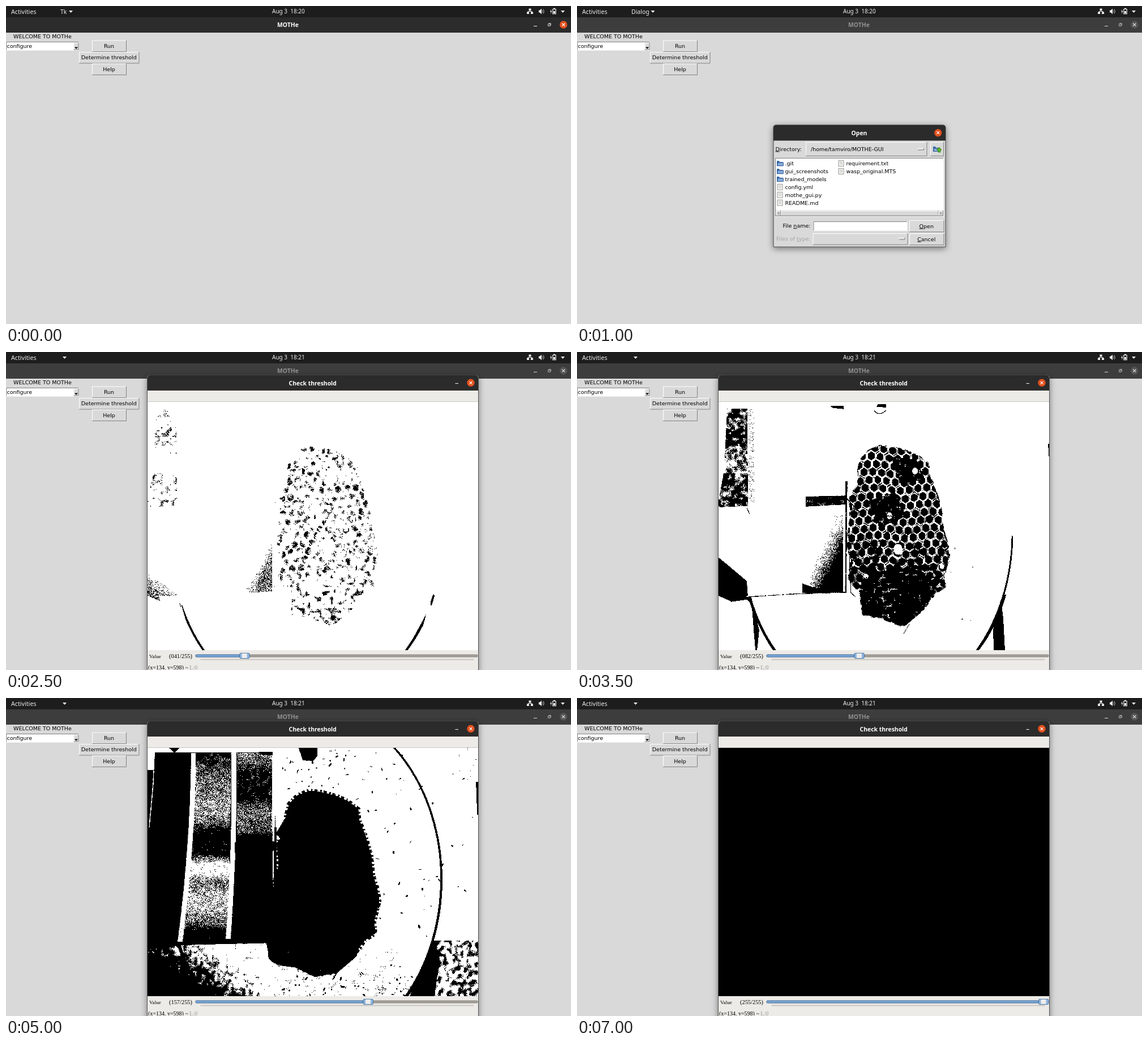
Write an HTML page with a canvas that moves like this. It is 998 px wide and 561 px high and loops after 7.5 s.

```html
<!DOCTYPE html>
<html lang="en">
<head>
<meta charset="utf-8">
<title>Threshold picker</title>
<style>
html, body { margin: 0; width: 100%; height: 100%; overflow: hidden; background: #d9d9d9; }
svg, canvas { position: absolute; left: 0; top: 0; display: block; }
canvas { left: 250px; top: 88px; }
text { white-space: pre; }
.tk { font: 9.5px "DejaVu Sans", sans-serif; }
.bar { font: 10.5px "Noto Sans", "Open Sans", sans-serif; fill: #eee; }
.head { font: bold 10.4px "Noto Sans", "Open Sans", sans-serif; text-anchor: middle; fill: #fff; }
.serif { font: 10.4px "Liberation Serif", serif; }
.mid { text-anchor: middle; }
.end { text-anchor: end; }
</style>
</head>
<body>
<svg id="stage" width="998" height="561" viewBox="0 0 998 561"></svg>
<canvas id="photo" width="584" height="438"></canvas>
<script>
const LOOP = 7500, STEP = 500;
const IMG = { x: 250, y: 88, w: 584, h: 438 };
const byId = id => document.getElementById(id);

// ---------- interface ----------
const rect = (x, y, w, h, fill, more = '') =>
  `<rect x="${x}" y="${y}" width="${w}" height="${h}" fill="${fill}" ${more}/>`;
const text = (x, y, str, cls = 'tk', more = '') =>
  `<text x="${x}" y="${y}" class="${cls}" ${more}>${str}</text>`;
const path = (d, fill, more = '') => `<path d="${d}" fill="${fill}" ${more}/>`;
const line = (d, color, width = 1) =>
  path(d, 'none', `stroke="${color}" stroke-width="${width}"`);
const under = c => `<tspan text-decoration="underline">${c}</tspan>`;

function bevel(x, y, w, h, face = '#d9d9d9', light = '#fff', dark = '#828282') {
  const r = x + w - .5, b = y + h - .5;
  return rect(x, y, w, h, face) +
    line(`M${x + .5} ${b}V${y + .5}H${r}`, light) +
    line(`M${x} ${b}H${r}V${y}`, dark);
}
const sunken = (x, y, w, h, face) => bevel(x, y, w, h, face, '#828282', '#f4f4f4');
const button = (x, y, w, h, label) =>
  bevel(x, y, w, h) + text(x + w / 2 - .5, y + h / 2 + 3, label, 'tk mid');
const closeIcon = (x, y, id = '') =>
  `<circle ${id} cx="${x}" cy="${y}" r="6.7" fill="#e2501d"/>` +
  line(`M${x - 2.5} ${y - 2.5}l5 5m0 -5l-5 5`, '#fff', 1.2);
const handle = (x, y) => bevel(x, y, 11, 4);

function folder(x, y) {
  return path(`M${x} ${y + 1}h4l1 2h6v7h-11z`, '#3465a4') +
    path(`M${x + 1} ${y + 4}h10.5v5.5h-10.5z`, '#86abd9', 'stroke="#28528c" stroke-width=".8"');
}
function sheet(x, y) {
  return rect(x + 1, y + .5, 9, 10, '#f5f5f3', 'stroke="#8c8c88" stroke-width=".9"') +
    line(`M${x + 3} ${y + 3}h5m-5 2h5m-5 2h5`, '#b5b5b2', .8);
}
const entry = (icon, x, y, name) => icon(x, y - 9) + text(x + 14.5, y, name);

const desktop = () => [
  rect(0, 0, 998, 561, '#d9d9d9'),
  rect(0, 0, 998, 20, '#1d1d1d'),
  text(9, 13.5, 'Activities', 'bar', 'style="font-size:10.7px"'),
  text(96, 13.5, '', 'bar', 'id="app"'),
  path('M-3.5 8h7l-3.5 4z', '#eee', 'id="arrow"'),
  text(470, 13, '', 'bar', 'id="clock" style="font-size:10px"'),
  // network, volume, battery, menu
  rect(923.5, 4.5, 4, 3.5, '#eee') + rect(920, 10.5, 4, 3.5, '#eee') + rect(927, 10.5, 4, 3.5, '#eee'),
  line('M925.5 8v1.5M922 11V9.5h7V11', '#eee'),
  path('M941 7.5h2l3 -3v10l-3 -3h-2z', '#eee'),
  line('M947.5 7q1.5 2.5 0 5M949 5.5q3 4 0 8', '#bbb', .9),
  line('M965.8 5.5h5.4v8.5h-5.4zM967 4.4h3', '#eee', 1.2) + rect(967, 9, 3, 4, '#eee'),
  path('M963.5 5.5l-2.5 4.5h1.6l-.8 4 2.6 -5h-1.6z', '#eee'),
  path('M980 8h7l-3.5 4z', '#eee'),
  rect(0, 20, 998, 27, '#2c2c2c', 'id="titleBar"'),
  text(498, 37, 'MOTHe', 'head', 'id="title"'),
  '<g id="controls">',
  line('M932 35.5h6', '#fff'),
  line('M957.5 31.8h3.5v3.5h-3.5zM958.8 31.5v-1h3.5v3.7h-1', '#ddd', .9),
  closeIcon(984.7, 33, 'id="close"'),
  '</g>',
  text(13, 56.5, 'WELCOME TO MOTHe'),
  sunken(0, 63, 129, 15.5, '#fff'),
  text(1.5, 73.5, 'configure'),
  bevel(119.5, 64.5, 9, 13) + path('M121 72.5h6l-3 3.2z', '#000'),
  button(152, 60.5, 61, 20.5, 'Run'),
  button(129, 81, 106.5, 20.5, 'Determine threshold'),
  button(152, 101.5, 61, 20.5, 'Help')
].join('');

const dialog = () => [
  '<g id="dialog">',
  path('M347 425V215q0 -5 5 -5h294q5 0 5 5v210z', '#d9d9d9',
    'filter="url(#shadow)" stroke="#444"'),
  path('M347 237.5V215q0 -5 5 -5h294q5 0 5 5v22.500z', '#2b2b2b'),
  text(498.5, 228, 'Open', 'head'),
  closeIcon(637.7, 223.7),
  text(350.500, 255.5, under('D') + 'irectory:'),
  bevel(404, 240, 214.5, 25) + text(413, 255.5, '/home/tamviro/MOTHE-GUI') + handle(602, 250.5),
  bevel(624, 240, 24, 25) + folder(629, 247) + path('M638 258v-4h-3l5 -5 4 5h-2v4z', '#58b523', 'stroke="#2c7410" stroke-width=".7"'),
  sunken(350, 268, 298, 104, '#fff'),
  ['.git', 'gui_screenshots', 'trained_models', 'config.yml', 'mothe_gui.py', 'README.md']
    .map((n, i) => entry(i < 3 ? folder : sheet, 353, 281.3 + i * 13.85, n)).join(''),
  ['requirement.txt', 'wasp_original.MTS']
    .map((n, i) => entry(sheet, 461, 281.3 + i * 13.85, n)).join(''),
  rect(351, 360.5, 296, 10.5, '#c3c3c3') + bevel(360, 361, 278.5, 9.5),
  bevel(351, 361, 9, 9.5) + bevel(638.5, 361, 8.500, 9.5),
  path('M357.500 363v5.500l-4 -2.700zM641 363v5.500l4 -2.700z', '#a3a3a3'),
  text(412.5, 391, `File ${under('n')}ame:`, 'tk end'),
  sunken(417.5, 380, 166, 17, '#fff'),
  text(412.5, 414, `Files of ${under('t')}ype:`, 'tk end', 'fill="#a3a3a3"'),
  bevel(416.5, 401, 168, 20.5) + handle(568.5, 408.5),
  button(587, 378, 61.5, 21, under('O') + 'pen'),
  button(587, 401, 61.5, 21, under('C') + 'ancel'),
  '</g>'
].join('');

const viewer = () => [
  '<g id="viewer">',
  path('M249.500 570V46q0 -5 5 -5h575q5 0 5 5v524z', '#edebe7', 'filter="url(#shadow)" stroke="#555"'),
  path('M250 68V46q0 -5 5 -5h574q5 0 5 5v22z', '#2b2b2b'),
  text(541.7, 58.500, 'Check threshold', 'head'),
  line('M793.500 55.5h5.5', '#fff'),
  closeIcon(821, 54.3),
  line('M250 87.5h584', '#c9c6c1'),
  text(253, 540, 'Value', 'serif', 'style="font-size:9.2px"'),
  text(288, 540, '', 'serif', 'id="count"'),
  rect(335, 534, 498, 4, '#a5a19b', 'rx="1.500" stroke="#77736d" stroke-width=".8"'),
  rect(335, 534, 0, 4, '#78a7d8', 'id="fill" rx="1.500" stroke="#3d6ca3" stroke-width=".8"'),
  path('M344 542.5H826', 'none', 'stroke="#a09d98" stroke-width="2" stroke-dasharray="1 1.100"'),
  '<g id="knob">',
  rect(.5, 531.3, 17.5, 9.2, '#f0efed', 'id="knobFace" rx="2" stroke="#74716c" stroke-width=".9"'),
  rect(4.500, 531.8, 9, 8.2, '#eeeeec'),
  '</g>',
  text(251, 560, '', 'serif', 'id="status" style="font-size:10px"'),
  rect(250, 560, 584, 1, '#edebe7'),
  '</g>'
].join('');

byId('stage').innerHTML = `<defs><filter id="shadow" x="-10%" y="-10%" width="120%" height="125%">
  <feDropShadow dx="0" dy="3" stdDeviation="6" flood-opacity=".45"/></filter></defs>` +
  desktop() + dialog() + viewer();

// ---------- brightness field ----------
function seeded(seed) {
  return () => {
    seed = seed + 0x6D2B79F5 | 0;
    let v = Math.imul(seed ^ seed >>> 15, 1 | seed);
    v = v + Math.imul(v ^ v >>> 7, 61 | v) ^ v;
    return ((v ^ v >>> 14) >>> 0) / 4294967296;
  };
}

// Red holds brightness, green the fine grain, blue the blotch strength.
const ink = (level, grain = 0, blotch = 0) => `rgb(${level},${grain},${blotch})`;

function paintScene(g, rnd) {
  const fill = (d, style) => { g.fillStyle = style; g.fill(new Path2D(d)); };
  const stroke = (d, style, width) => {
    g.strokeStyle = style; g.lineWidth = width; g.stroke(new Path2D(d));
  };
  const ramp = (x0, y0, x1, y1, stops, grain, blotch) => {
    const r = g.createLinearGradient(x0, y0, x1, y1);
    stops.forEach(([at, level]) => r.addColorStop(at, ink(level, grain, blotch)));
    return r;
  };
  const down = (y0, y1, stops, grain, blotch) => ramp(0, y0, 0, y1, stops, grain, blotch);
  const box = (x, y, w, h) => `M${x} ${y}h${w}v${h}h${-w}z`;
  const specks = (n, x, y, w, h, low, high, size) => {
    for (let i = 0; i < n; i++) {
      g.fillStyle = ink(low + rnd() * (high - low), 0, 12);
      g.beginPath();
      g.ellipse(x + rnd() * w, y + rnd() * h, .6 + rnd() * size, .5 + rnd() * 1.2, rnd() * 3, 0, 7);
      g.fill();
    }
  };

  // table
  fill(box(250, 88, 584, 438), ink(180, 6, 10));
  fill(box(795, 88, 39, 57), ink(188, 10, 30));
  fill('M780 143L834 150V436L795 410z', down(140, 436, [[0, 215], [.2, 226], [.78, 222], [1, 188]], 8, 24));
  fill(box(755, 428, 79, 98), ink(163, 10, 36));
  fill('M830 148h4v58h-2z', ink(130));
  fill('M832 162h2v22h-1z', ink(60));

  // plate
  const disc = 'M287 320a241 307 0 1 0 482 0a241 307 0 1 0 -482 0z';
  fill(disc, ramp(760, 120, 616, 492, [[0, 228], [.38, 219], [.48, 200], [.56, 182], [1, 174]], 13, 11));
  fill('M476 88H584L582 120L610 135V210H476z', down(88, 215, [[0, 196], [.3, 208], [.75, 200], [1, 182]], 5, 34));
  stroke('M512 114L600 117L716 120', ink(186), 1.6);
  specks(90, 612, 100, 140, 200, 150, 198, 3.5);
  specks(55, 610, 95, 215, 330, 95, 165, 3);
  specks(45, 478, 92, 130, 70, 110, 165, 3);
  specks(55, 470, 485, 250, 41, 100, 160, 3);
  specks(9, 500, 340, 220, 185, 40, 80, 2);

  // lower left
  fill('M250 428H478V526H250z', ramp(320, 520, 385, 425, [[0, 118], [.48, 157], [.8, 178], [1, 180]], 9, 22));
  fill('M757 428L766 460L757 526H713L740 470z', ink(130));
  stroke(disc, down(88, 526, [[0, 140], [.45, 110], [.56, 76], [1, 30]]), 3.6);
  stroke('M306 436Q322 488 350 528M756 428Q740 484 706 528', ink(40), 4.5);
  fill('M308 440L320 482L322 490L318 526H315z', ink(45));
  fill('M749 436L753 470L756 526H736L735 490z', ink(45));

  // clear container
  fill(box(250, 88, 226, 8), ink(176, 6, 4));
  fill('M288 88H306L298 97zM250 96H476V432L300 436L250 438z', ink(128, 9));
  fill('M250 96H263L261 127H250z', ink(174));
  stroke('M262 98L260 150L253 228', ink(168, 8), 1.8);
  fill('M336 97H398L395 320L388 425H313L330 240z', down(97, 430, [[0, 132], [.12, 150], [.28, 164], [.36, 156],
    [.42, 126], [.54, 130], [.58, 178], [.64, 181], [.69, 152], [.74, 168], [.82, 169], [.9, 148], [.95, 125]], 24, 12));
  fill(box(408, 97, 64, 328), down(97, 425, [[0, 160], [.1, 138], [.24, 134], [.31, 154], [.42, 148], [.46, 122], [1, 118]], 22, 8));
  fill('M327 97H335C335 220 325 330 312 430H303C316 330 326 220 327 97z',
    down(97, 430, [[0, 190], [.5, 186], [.62, 176], [1, 172]], 16));
  fill('M398 95H407C408 220 404 320 397 425H388C396 320 400 220 398 95z',
    down(95, 425, [[0, 232], [.55, 222], [.7, 196], [1, 174]], 12));
  fill(box(406, 92.500, 70, 2), ink(218));
  fill(box(470.500, 93, 5, 332), down(93, 425, [[0, 232], [.33, 212], [.36, 180], [.72, 155], [.8, 120], [1, 110]], 4));

  // dark furniture seen through it
  fill('M265 100H301V180H261z', ink(68, 18, 42));
  fill('M261 180H301L303 214L258 220z', ink(86, 16, 34));
  fill('M259 214H302V272L250 274V262z', ink(66, 18, 40));
  fill(box(303, 100, 10, 165), ink(104, 26));
  stroke('M300 275L305 286', ink(60), 1.5);
  fill('M404 255L474 253V269L404 273z', ink(68, 12, 12));
  fill('M414 280H470V425H412z', ramp(418, 340, 468, 366, [[0, 116], [.45, 98], [.7, 72], [1, 40]], 22, 6));
  fill('M398 408L425 418V425H398z', ink(62, 10));
  fill('M250 362L300 404L302 430L272 440L250 430z', ramp(250, 430, 290, 372, [[0, 35], [.7, 62], [1, 88]], 12));
  fill('M270 430L308 432L311 447L300 437L272 441z', ink(50));
  stroke('M302 432L380 427L474 424', ink(74, 10, 10), 1.8);
  fill('M447 95H471V101L452 99z', ink(60));
  fill('M517 88H550V102L543 111L524 110z', ink(120, 0, 18));
  fill('M531 92H546V98L529 97z', ink(62));
  stroke('M525 103Q533 115 546 103', ink(68), 1.5);

  // nest and its shadow
  fill('M476 240L500 200V470L545 492L585 485L620 455V400L476 300zM476 240L474 432H459Q463 438 463 456Q466 472 510 475L560 485V300z', ink(130, 5, 8));
  const nest = 'M535 164L515 172L500 187L494 212L496 234L478 256L482 292L473 335L483 366L478 402L498 425L504 464L540 472L577 486L588 476L612 456L634 427L652 415L650 395L659 358L656 338L648 312L645 278L634 240L624 216L622 196L604 182L584 173L556 166z';
  g.setLineDash([3, 4, 6, 3]);
  stroke(nest, ink(140, 8, 18), 8);
  g.setLineDash([]);
  fill(nest, ink(48, 10, 24));
  g.save();
  g.clip(new Path2D(nest));
  const wall = down(165, 485, [[0, 116], [.5, 100], [.75, 80], [1, 66]], 10, 30);
  for (let row = 0; row < 24; row++) for (let col = 0; col < 17; col++) {
    const x = 440 + col * 15.500 + (row % 2) * 7.750 + row * 1.2, y = 158 + row * 14 + Math.sin(col) * 3;
    let d = '';
    for (let k = 0; k < 6; k++) {
      const a = Math.PI / 3 * k + Math.PI / 6;
      d += `${k ? 'L' : 'M'}${x + 7.8 * Math.cos(a)} ${y + 8.8 * Math.sin(a)}`;
    }
    stroke(d + 'z', wall, 1.7);
  }
  fill('M555 185L600 190L615 225L570 232zM515 262L562 248L580 290L535 310z', ink(58, 10, 28));
  fill('M510 390L600 380L635 410L600 470L505 465z', ink(58, 8, 32));
  stroke(nest, ink(84, 12, 36), 3);
  g.restore();
  [[552, 289, 5], [567, 348, 8], [597, 210, 5], [511, 396, 4], [645, 378, 4]].forEach(([x, y, r]) => {
    g.fillStyle = ink(104, 8, 30);
    g.beginPath(); g.ellipse(x, y, r, r * 1.2, 0, 0, 7); g.fill();
  });
  fill('M474 228H478L476 425H473.500z', ink(62, 14, 12));
  stroke('M476 258L508 292M481 360L484 425L492 432M587 480L577 497', ink(62), 1.4);
}

function buildField() {
  const { x, y, w, h } = IMG, rnd = seeded(11), cell = 5, cols = Math.ceil(w / cell) + 2;
  const art = document.createElement('canvas');
  art.width = w; art.height = h;
  const g = art.getContext('2d', { willReadFrequently: true });
  g.translate(-x, -y);
  paintScene(g, rnd);
  const px = g.getImageData(0, 0, w, h).data;
  const knots = Float32Array.from({ length: cols * (Math.ceil(h / cell) + 2) }, () => rnd() * 2 - 1);
  const mix = (a, b, t) => a + (b - a) * t;
  return Float32Array.from({ length: w * h }, (_, i) => {
    const u = i % w / cell, v = Math.floor(i / w) / cell;
    const k = Math.floor(v) * cols + Math.floor(u), fu = u % 1, fv = v % 1;
    const blotch = mix(mix(knots[k], knots[k + 1], fu), mix(knots[k + cols], knots[k + cols + 1], fu), fv);
    const level = px[i * 4] + px[i * 4 + 1] * (rnd() * 2 - 1) + px[i * 4 + 2] * blotch;
    return Math.min(254, Math.max(3, level));
  });
}

const field = buildField();
const screen = byId('photo').getContext('2d');
const bitmap = screen.createImageData(IMG.w, IMG.h);
const out = new Uint32Array(bitmap.data.buffer);

function threshold(value) {
  for (let i = 0; i < out.length; i++) out[i] = field[i] > value ? 0xffffffff : 0xff000000;
  screen.putImageData(bitmap, 0, 0);
}

// ---------- timeline ----------
const keys = [[1500, 0], [3500, 82], [5000, 157], [6000, 199], [7000, 255]];
function valueAt(t) {
  const i = keys.findIndex(k => t <= k[0]);
  if (i < 1) return i < 0 ? 255 : 0;
  const [t0, v0] = keys[i - 1], [t1, v1] = keys[i];
  return Math.round(v0 + (v1 - v0) * (t - t0) / (t1 - t0));
}
const set = (id, attrs) => {
  for (const name in attrs) byId(id).setAttribute(name, attrs[name]);
};
const show = (id, on) => { byId(id).style.display = on ? 'block' : 'none'; };

function render(t) {
  const idle = t < 500, viewing = t >= 1500, value = valueAt(t), x = value / 255 * 480;
  byId('app').textContent = idle ? 'Tk' : viewing ? '' : 'Dialog';
  set('arrow', { transform: `translate(${idle ? 114.5 : viewing ? 103.5 : 134} 0)` });
  byId('clock').textContent = t < 2500 ? 'Aug 3  18:20' : 'Aug 3  18:21';
  set('titleBar', { fill: idle ? '#2c2c2c' : '#3d3d3d' });
  byId('title').style.fill = idle ? '#fff' : '#929292';
  set('close', { fill: idle ? '#e2501d' : '#5b5b5b' });
  set('controls', { opacity: idle ? 1 : .8 });
  show('dialog', !idle && !viewing);
  show('viewer', viewing);
  show('photo', viewing);
  if (!viewing) return;
  byId('count').textContent = `(${String(value).padStart(3, '0')}/255)`;
  const [pos, level] = t < 2000 ? ['(x=19, y=44) ~ ', 255] : ['(x=134, y=598) ~ ', 0];
  byId('status').innerHTML = `${pos}<tspan fill="#999">L:${level}</tspan>`;
  set('fill', { width: x });
  set('knob', { transform: `translate(${335 + x} 0)` });
  set('knobFace', { fill: value ? '#8db4de' : '#f0efed', stroke: value ? '#3d6ca3' : '#74716c' });
  threshold(value);
}

const start = performance.now();
let shown = -1;
function tick() {
  const t = Math.floor((performance.now() - start) % LOOP / STEP) * STEP;
  if (t !== shown) render(shown = t);
  requestAnimationFrame(tick);
}
tick();
</script>
</body>
</html>
```
